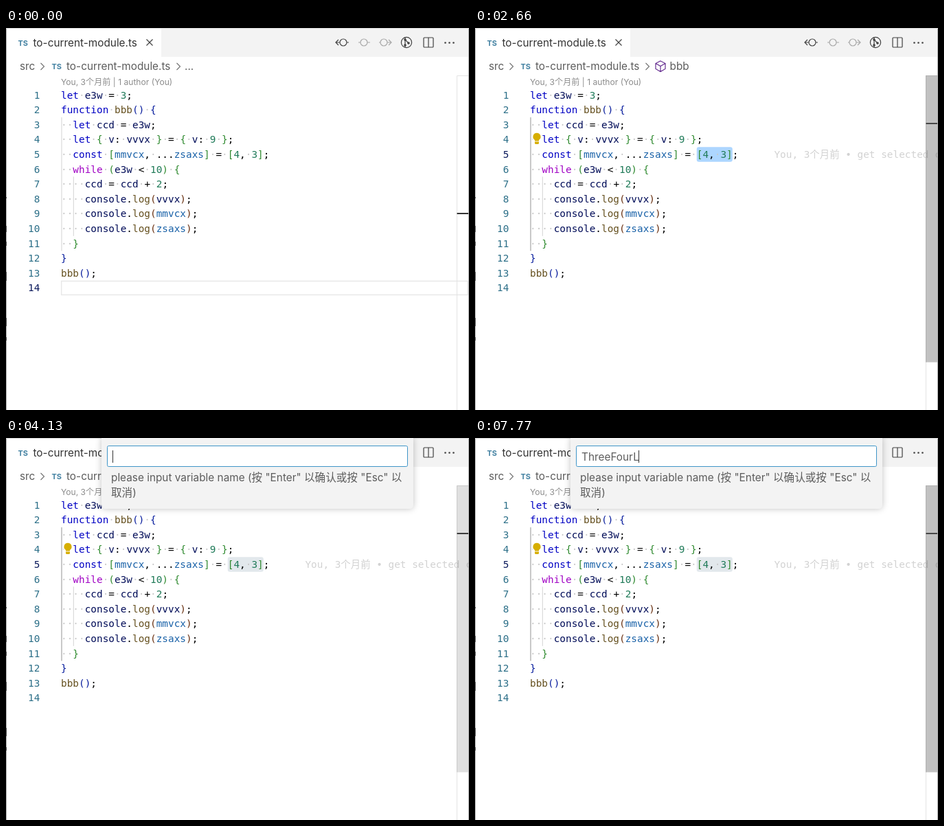
An HTML page that plays this animation: 674x556 px, repeating every 8000 ms.

```html
<!DOCTYPE html>
<html lang="en">
<head>
<meta charset="utf-8">
<title>Extract constant</title>
<style>
  html, body { margin: 0; width: 100%; height: 100%; overflow: hidden; background: #fff; }
  svg { display: block; width: 674px; height: 556px; }
  text { white-space: pre; }
  .ui { font: 15.35px Inter, "Noto Sans CJK SC", "Noto Sans CJK", sans-serif; fill: #5c5c5c; }
  .cjk { font-size: 15.6px; }
  .lens { font-size: 12.1px; fill: #8c8c8c; }
  .ts { font-size: 11px; font-weight: 700; fill: #4583a3; }
  .code { font: 14.4px "DejaVu Sans Mono", "Noto Sans CJK SC", "Noto Sans CJK", monospace; fill: #000; }
  .num { text-anchor: end; fill: #2c6f88; }
  .num.on { fill: #0b1a5c; }
  .line { fill: none; stroke: #424242; stroke-width: 1.2; }
  .dim { opacity: .42; }
  .panel { fill: #f3f3f3; filter: drop-shadow(0 0 4.8px rgba(0, 0, 0, .24)); }
</style>
</head>
<body>
<svg viewBox="0 0 674 556">
  <rect width="674" height="556" fill="#fff"/>

  <g id="tabs">
    <rect x="226" width="448" height="42" fill="#f3f3f3"/>
    <text class="ui ts" x="17.5" y="25.5">TS</text>
    <text class="ui" x="39.5" y="27" style="fill:#333">to-current-module.ts</text>
    <path class="line" d="M204.500 16.500l9 9m0-9l-9 9"/>
    <g class="line">
      <path d="M486 21h-6m4-4l-4 4l4 4M496 21h3"/><circle cx="491" cy="21" r="5"/>
    </g>
    <g class="line dim">
      <path d="M513 21h3m10 0h4"/><circle cx="521" cy="21" r="5"/>
      <path d="M543 21h2m10 0h6m-4-4l4 4l-4 4"/><circle cx="550" cy="21" r="5"/>
    </g>
    <g class="line">
      <circle cx="583" cy="21" r="7.600"/>
      <path d="M581 14v14M581 17l5 5"/>
      <g fill="#424242"><circle cx="581" cy="17" r="1.200"/><circle cx="586" cy="22" r="1.200"/><circle cx="581" cy="25" r="1.200"/></g>
      <rect x="608" y="14" width="14" height="14" rx="1"/><path d="M615 14v14"/>
    </g>
    <g fill="#424242"><circle cx="639.500" cy="21.500" r="1.300"/><circle cx="645.500" cy="21.500" r="1.300"/><circle cx="651.500" cy="21.500" r="1.300"/></g>
  </g>

  <g id="crumbs">
    <text class="ui" x="20" y="61">src</text>
    <text class="ui ts" x="66.500" y="59.500">TS</text>
    <text class="ui" x="88" y="61">to-current-module.ts</text>
    <path class="line" style="stroke:#777" d="M50.500 51l5 5l-5 5M248.500 51l5 5l-5 5"/>
    <text class="ui" id="dots" x="260" y="61">...</text>
    <g id="symbol">
      <path class="line" style="stroke:#652d90" d="M270 48l7 3.500v8l-7 4l-7-4v-8zM263 51.500l7 4l7-4M270 55.500v8"/>
      <text class="ui" x="283.500" y="61">bbb</text>
    </g>
  </g>

  <g id="back"></g>
  <rect id="row" x="80.700" width="591.500" height="20" fill="none" stroke="#e8e8e8" stroke-width="1.500"/>
  <rect id="select" y="173.200" height="21.600" rx="3"/>
  <g id="match" fill="rgba(0,100,0,.1)" stroke="#b9b9b9">
    <rect x="323.200" y="173.700" width="8.200" height="20.500"/>
    <rect x="366.600" y="173.700" width="8.200" height="20.500"/>
  </g>
  <text class="ui lens" x="80" y="83">You, 3个月前 | 1 author (You)</text>
  <g id="editor"></g>
  <text class="code" id="blame" x="435.400" y="188.900" style="fill:#d2d2d2">You, 3个月前 • get selected code</text>
  <rect id="caret" y="173.200" width="2" height="21.600"/>
  <g id="bulb">
    <rect x="84" y="152" width="13" height="19" fill="#fff"/>
    <path fill="#d6ae00" d="M90 152.800a5.600 5.600 0 0 1 3 10.300v1.400h-6v-1.400a5.600 5.600 0 0 1 3-10.300zM87 165.500h6v2q0 1.500-1.500 1.500h-3q-1.500 0-1.500-1.500z"/>
  </g>

  <g id="ruler">
    <path d="M656.500 556V69.500H673" fill="none" stroke="#e4e4e4"/>
    <rect id="mark" x="660.500" y="139" width="8" height="14.500" fill="#777"/>
    <rect id="tick" x="656.500" width="16.500" height="2" fill="#333"/>
    <rect id="slider" x="656" y="69" width="17.500" height="417.500" fill="rgba(100,100,100,.4)"/>
  </g>

  <g id="edges">
    <path d="M.5 0V556M673.500 0V556" stroke="#aaa" fill="none"/>
    <path d="M0 .5H674" stroke="#d8d8d8"/>
    <path d="M.5 246v2m0 40v9m0 14v6m0 38v13m0 54v12m0 16v5" stroke="#444" fill="none"/>
  </g>

  <g id="palette">
    <path id="frame" class="panel"/>
    <rect x="147.500" y="11.500" width="437" height="30" rx="2" fill="#fff" stroke="#3f95c8"/>
    <g id="list"></g>
    <g id="prompt"></g>
    <text class="ui" id="typed" x="155" y="32.500"></text>
    <rect id="bar" y="18" width="1" height="18" fill="#333"/>
  </g>
</svg>

<script>
const LOOP = 8000, CH = 8.67, LINE = 21.6, LEFT = 80;
const $ = id => document.getElementById(id);
const show = (id, on) => { $(id).style.display = on ? '' : 'none'; };
const set = (id, attrs) => Object.entries(attrs).forEach(([k, v]) => $(id).setAttribute(k, v));
const clamp = v => Math.max(0, Math.min(1, v));
const within = (t, a, b) => t >= a && t < b;
const lineTop = n => 86.8 + LINE * (n - 1);
const esc = s => s.replace(/&/g, '&amp;').replace(/</g, '&lt;');

const source = `let e3w = 3;
function bbb() {
  let ccd = e3w;
  let { v: vvvx } = { v: 9 };
  const [mmvcx, ...zsaxs] = [4, 3];
  while (e3w < 10) {
    ccd = ccd + 2;
    console.log(vvvx);
    console.log(mmvcx);
    console.log(zsaxs);
  }
}
bbb();
`.split('\n');

const bracketColors = ['#0a1f9e', '#2f8a2f', '#6b3314'];
const rules = [
  [/^ $/, '#c8c8c8'],
  [/^(let|const|function)$/, '#0000c4'],
  [/^while$/, '#a000c4'],
  [/^(bbb|log)$/, '#65501f'],
  [/^(mmvcx|zsaxs)$/, '#1a62a8'],
  [/^\d+$/, '#1f7a58'],
  [/^\w+$/, '#000c58']
];
let depth = 0;

function tokenColor(tok) {
  if (/[([{]/.test(tok)) return bracketColors[depth++ % 3];
  if (/[)\]}]/.test(tok)) return bracketColors[--depth % 3];
  const rule = rules.find(([re]) => re.test(tok));
  return rule ? rule[1] : '#000';
}

function highlight(line) {
  return (line.match(/\w+|\W/g) || []).map(tok =>
    `<tspan style="fill:${tokenColor(tok)}">${tok === ' ' ? '·' : esc(tok)}</tspan>`).join('');
}

$('editor').innerHTML = source.map((line, i) => {
  const y = lineTop(i + 1) + 15.7;
  return `<text class="code num" id="n${i + 1}" x="49.3" y="${y}">${i + 1}</text>` +
    `<text class="code" x="${LEFT}" y="${y}">${highlight(line)}</text>`;
}).join('');

$('back').innerHTML =
  `<path id="guide" d="M81 ${lineTop(3)}V${lineTop(12)}"/>` +
  `<path stroke="#d3d3d3" d="M98.300 ${lineTop(7)}V${lineTop(11)}"/>`;

const ui = (x, y, s, fill = '') =>
  `<text class="ui" x="${x}" y="${y}" style="fill:${fill}">` +
  esc(s).replace(/[\u4e00-\u9fff]+/g, '<tspan class="cjk">$&</tspan>') + '</text>';

const gear = (x, y, color) =>
  `<g fill="none" stroke="${color}" stroke-width="1.1"><circle cx="${x}" cy="${y}" r="5.8"/>` +
  `<circle cx="${x}" cy="${y}" r="2.2"/>` +
  `<circle cx="${x}" cy="${y}" r="7" stroke-width="1.8" stroke-dasharray="2.75"/></g>`;

const bar = (y, fill) => `<rect x="146" y="${y}" width="440" height="26" rx="3" fill="${fill}"/>`;

const commands = [
  'Extract constant To Current Module',
  'Extract expression To Current Block',
  'Extract expression To Current Module',
  'Clean By Re-Name Identifier In Module',
  'Clean By Re-Order Global Statements',
  'Extract Statements To Current Module',
  'Extract Element-With-Specified-Attributes To Co...',
  'Extract Elements To Component',
  'Extract Statement To New Module',
  'Clean By Remove Unused Code In Module'
];
$('list').innerHTML = bar(52, '#1b62bd') + bar(289, '#e8e8e8') +
  commands.map((c, i) => ui(158.5, 70 + 26.4 * i, 'jvs - ' + c, i ? '#505050' : '#fff')).join('') +
  ui(477.5, 70, '最近使用', '#fff') + gear(557, 64.5, '#fff') + gear(557, 302, '#555');

$('prompt').innerHTML = ui(153, 63, 'please input variable name (按 "Enter" 以确认或按 "Esc" 以') + ui(153, 85, '取消)');

const word = 'ThreeFourL';
const keys = [5530, 5740, 5950, 6300, 6510, 6790, 7000, 7210, 7420, 7770];

function drawEditor(t) {
  const moved = t >= 980, selected = t >= 2100, focused = t < 3150;
  const line = moved ? 5 : 14;
  $('n5').classList.toggle('on', moved);
  $('n14').classList.toggle('on', !moved);
  set('row', { y: lineTop(line) + .8 });
  show('row', !selected);
  set('guide', { stroke: moved ? '#939393' : '#d3d3d3' });
  set('tick', { y: moved ? 138 : 269 });
  show('dots', t < 1050);
  show('symbol', t >= 1050);
  show('match', within(t, 1050, 2100));
  show('mark', within(t, 1050, 2100));
  show('blame', t >= 1330);
  show('bulb', t >= 2310);

  const from = t < 2170 ? 31 : 28;
  const x = LEFT + from * CH;
  set('select', { x, width: (34 - from) * CH, fill: focused ? '#add6ff' : '#e2e8ec' });
  show('select', selected);
  set('caret', { x: selected ? x - .5 : LEFT + 34 * CH });
  show('caret', within(t, 980, 1540) || within(t, 2030, 2590));

  const alpha = t < 3500 ? clamp((t - 1000) / 150)
    : t < 4060 ? 1 - clamp((t - 3500) / 400)
    : clamp((t - 4060) / 140);
  set('slider', { opacity: alpha });
}

function drawPalette(t) {
  const open = t >= 3150, naming = t >= 4130;
  show('palette', open);
  if (!open) return;
  show('list', !naming);
  show('prompt', naming);
  set('frame', { d: `M139 0H593V${naming ? 97 : 315}q0 6-6 6H145q-6 0-6-6z` });
  const text = naming ? word.slice(0, keys.filter(k => t >= k).length) : '>';
  $('typed').textContent = text;
  set('bar', { x: 155 + (text ? $('typed').getComputedTextLength() - .8 : 0) });
  show('bar', !within(t, 3570, 4130) && !within(t, 4620, 5180));
}

const start = performance.now();
function frame() {
  const t = (performance.now() - start) % LOOP;
  drawEditor(t);
  drawPalette(t);
  requestAnimationFrame(frame);
}
frame();
</script>
</body>
</html>
```
